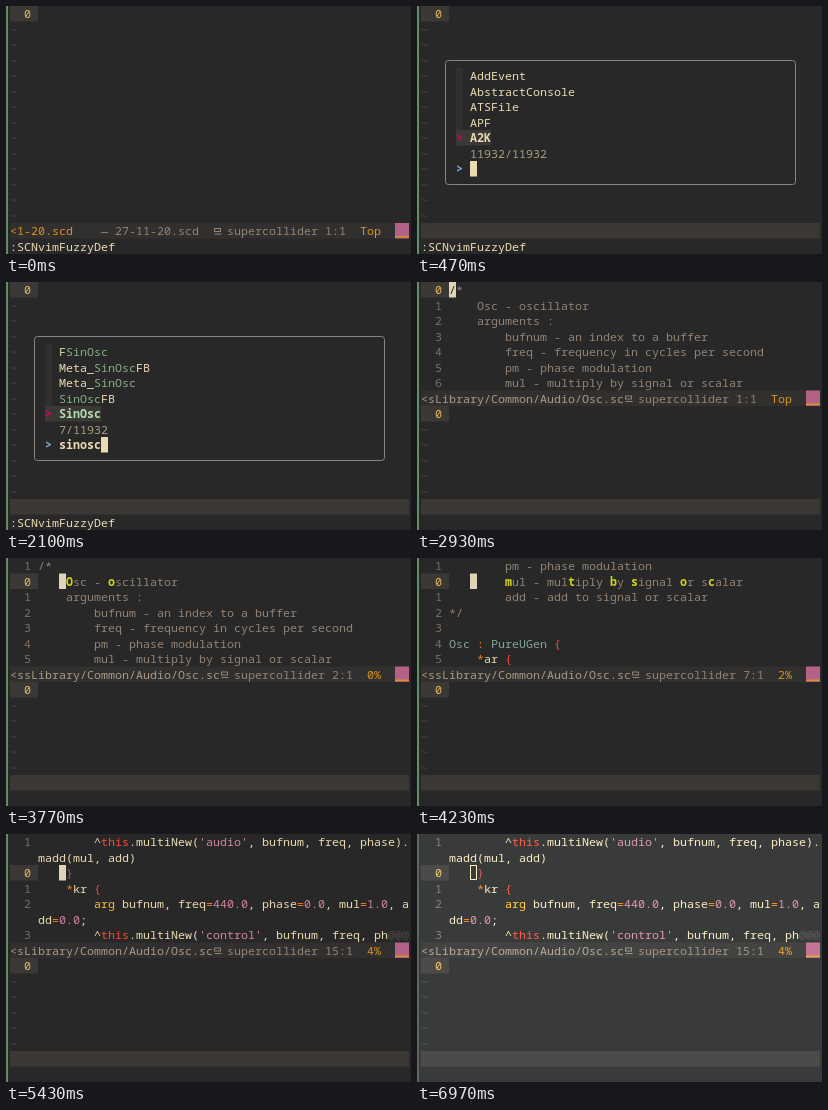
Write an HTML page with a canvas that moves like this. It is 405 px wide and 248 px high and loops after 7060 ms.

```html
<!DOCTYPE html>
<html>
<head>
<meta charset="utf-8">
<style>
html, body { margin: 0; width: 100%; height: 100%; overflow: hidden; background: #282828; }
canvas { display: block; }
</style>
</head>
<body>
<canvas id="stage" width="405" height="248"></canvas>
<script>
const ctx = document.getElementById('stage').getContext('2d');
const LOOP = 7060, CW = 7, RH = 15.5, LEFT = 4, WRAP = 53;
const C = {
  bg: '#282828', bar: '#3c3836', status: '#32302f', text: '#ebdbb2', gray: '#928374',
  dim: '#504945', num: '#7c6f64', yellow: '#e9b95c', orange: '#d8921f', red: '#fb4934',
  pink: '#d3869b', blue: '#83a598', match: '#87af87', scope: '#d2d21c'
};

const source = [
  '/*',
  '    Osc - oscillator',
  '    arguments :',
  '        bufnum - an index to a buffer',
  '        freq - frequency in cycles per second',
  '        pm - phase modulation',
  '        mul - multiply by signal or scalar',
  '        add - add to signal or scalar',
  '*/',
  '',
  'Osc : PureUGen {',
  '    *ar {',
  '        arg bufnum, freq=440.0, phase=0.0, mul=1.0, add=0.0;',
  "        ^this.multiNew('audio', bufnum, freq, phase).madd(mul, add)",
  '    }',
  '    *kr {',
  '        arg bufnum, freq=440.0, phase=0.0, mul=1.0, add=0.0;',
  "        ^this.multiNew('control', bufnum, freq, phase).madd(mul, add)"
];
const COMMENT_LINES = 9, TOTAL_LINES = 340;

// time, first visible line, cursor line
const views = [
  [2930, 1, 1], [3770, 1, 2], [3930, 1, 3], [4070, 1, 4],
  [4230, 6, 7], [4870, 11, 12], [5430, 14, 15]
];

// time, query, counter, results from top to bottom
const searches = [
  [200, '', '', ''],
  [290, '', '0/0', ''],
  [380, '', '5210/5210', 'AddEvent AbstractConsole ATSFile APF A2K'],
  [470, '', '11932/11932', 'AddEvent AbstractConsole ATSFile APF A2K'],
  [1670, 's', '6030/11932', 'Saw s_ sc sr s'],
  [1770, 'si', '1486/11932', 'Sieve size sign Sink sin'],
  [1800, 'sin', '418/11932', 'sinh Sink SinOsc Sine sin'],
  [1970, 'sino', '12/11932', 'FSinOsc Meta_SinOscFB Meta_SinOsc SinOscFB SinOsc'],
  [2035, 'sinos', '8/11932', 'FSinOsc Meta_SinOscFB Meta_SinOsc SinOscFB SinOsc'],
  [2100, 'sinosc', '7/11932', 'FSinOsc Meta_SinOscFB Meta_SinOsc SinOscFB SinOsc']
];

const latest = (list, t) => list.filter(item => item[0] <= t).pop();

function cells(row, col, width, color, height = 1) {
  ctx.fillStyle = color;
  ctx.fillRect(LEFT + col * CW, row * RH, width * CW, height * RH);
}

// color and bold may be functions of the character index
function put(row, col, text, color, bold = false) {
  [...text].forEach((ch, i) => {
    const c = typeof color === 'function' ? color(i) : color;
    ctx.font = `${bold || c === C.scope ? 'bold ' : ''}11.667px "Noto Sans Mono", monospace`;
    ctx.fillStyle = c;
    ctx.fillText(ch, LEFT + (col + i) * CW, row * RH + 12);
  });
}

function lineNumber(row, n) {
  if (!n) cells(row, 0, 4, C.bar);
  put(row, 2, String(n), n ? C.num : C.yellow);
}

function tildes(from, to) {
  for (let r = from; r <= to; r++) put(r, 0, '~', C.dim);
}

function statusLine(row, right, drawLeft) {
  cells(row, 0, 57, C.status);
  const info = 'supercollider ' + right;
  const col = 53 - info.length, split = info.lastIndexOf(' ');
  put(row, col, info, i => i > split ? C.orange : C.gray);
  const x = LEFT + (col - 2) * CW + 1.5, y = row * RH + 5.5;
  ctx.strokeStyle = C.gray;
  ctx.lineWidth = 1;
  ctx.strokeRect(x, y, 6, 3);
  ctx.beginPath();
  ctx.moveTo(x, y + 5.5);
  ctx.lineTo(x + 7, y + 5.5);
  ctx.stroke();
  drawLeft(col - 4);
  cells(row, 55, 2, '#b16286');
  ctx.fillStyle = C.orange;
  ctx.fillRect(LEFT + 55 * CW, row * RH + 13, 2 * CW, 1.5);
}

function lineColors(n, isCurrent) {
  const line = source[n - 1];
  const colors = Array(line.length).fill(n <= COMMENT_LINES ? C.gray : C.text);
  if (n > COMMENT_LINES) {
    const tokens = [
      [/[*=:]/g, '#fe8019'], [/[{}]/g, C.red], [/\bthis\b/g, C.red], [/\barg\b/g, '#fabd2f'],
      [/'\w+'|\d+\.\d/g, C.pink], [/\b[A-Z]\w+/g, C.blue]
    ];
    for (const [re, color] of tokens)
      for (const m of line.matchAll(re)) colors.fill(color, m.index, m.index + m[0].length);
  }
  if (isCurrent) {
    // mark the first unseen letter of each word
    const seen = new Set();
    for (const m of line.matchAll(/\w+/g)) {
      const k = [...m[0]].findIndex(ch => !seen.has(ch));
      if (k >= 0) colors[m.index + k] = C.scope;
      [...m[0]].forEach(ch => seen.add(ch));
    }
    if (line.trim() === '}') colors.fill('#b5504a');
  }
  return colors;
}

function drawCursor(row, col, ch, hollow) {
  if (hollow) {
    ctx.strokeStyle = C.text;
    ctx.lineWidth = 1;
    ctx.strokeRect(LEFT + col * CW + 0.5, Math.round(row * RH) + 0.5, CW - 1, 14);
    return;
  }
  cells(row, col, 1, '#e0d4b8');
  put(row, col, ch, C.bg);
}

function drawSource(t) {
  const [, top, current] = latest(views, t);
  const blinkedOff = (t >= 3530 && t < 3770) || (t >= 6100 && t < 6600);
  for (let row = 0, n = top; row < 7 && n <= source.length; n++) {
    const line = source[n - 1], colors = lineColors(n, n === current);
    lineNumber(row, Math.abs(n - current));
    const rows = Math.max(1, Math.ceil(line.length / WRAP));
    const cut = row + rows > 7;
    for (let k = 0; k < rows && row < 7; k++, row++) {
      const start = k * WRAP;
      put(row, 4, line.slice(start, start + (cut ? WRAP - 3 : WRAP)), i => colors[start + i]);
      if (cut) put(row, 54, '@@@', C.dim);
    }
    if (n === current && !blinkedOff) {
      const col = n === 1 ? 0 : 3;
      drawCursor(row - 1, 4 + col, line[col], t >= 6900);
    }
  }
  const place = current === 1 ? 'Top' : Math.floor(100 * current / TOTAL_LINES) + '%';
  statusLine(7, `${current}:1  ${place}`, width =>
    put(7, 0, '<' + 'SCClassLibrary/Common/Audio/Osc.sc'.slice(1 - width - 2), '#a89984'));
  lineNumber(8, 0);
  tildes(9, 13);
  cells(14, 0, 57, C.bar);
}

function drawFinder(t) {
  const [, query, count, names] = latest(searches, t);
  cells(3, 3, 51, C.bg, 9);
  ctx.strokeStyle = '#8a857c';
  ctx.lineWidth = 1;
  ctx.beginPath();
  ctx.roundRect(28.5, 54.5, 350, 124, 3);
  ctx.stroke();
  if (!count) return;
  const selected = t >= 2630 ? 3 : 4;
  if (names) {
    cells(4, 5, 1, C.status, 5);
    names.split(' ').forEach((name, i) => {
      const row = 4 + i, on = i === selected;
      const at = query ? name.toLowerCase().indexOf(query) : -1;
      const hit = k => at >= 0 && k >= at && k < at + query.length;
      if (on) {
        cells(row, 5, 2 + name.length, C.bar);
        put(row, 5, '>', '#d7005f', true);
      }
      put(row, 7, name, k => hit(k) ? (on ? '#afdfaf' : C.match) : C.text, on);
    });
  }
  put(9, 7, count, '#a8a080');
  put(10, 5, '>', '#87afd7', true);
  put(10, 7, query, C.text, true);
  cells(10, 7 + query.length, 1, C.text);
}

function drawStart(t) {
  lineNumber(0, 0);
  tildes(1, 13);
  put(15, 0, ':SCNvimFuzzyDef', C.text);
  if (t < 200) {
    statusLine(14, '1:1  Top', () => {
      put(14, 0, '<1-20.scd', C.orange);
      put(14, 13, '— 27-11-20.scd', C.gray);
    });
  } else {
    cells(14, 0, 57, C.bar);
    drawFinder(t);
  }
}

function draw(t) {
  ctx.fillStyle = C.bg;
  ctx.fillRect(0, 0, 405, 248);
  const fade = t < 6900 ? 0 : t < 6935 ? 1 / 3 : t < 6970 ? 2 / 3 : 1;
  ctx.fillStyle = fade ? '#4a524b' : '#5f8f64';
  ctx.fillRect(0, 0, 2, 248);
  if (t < 2930) drawStart(t);
  else drawSource(t);
  if (fade) {
    ctx.globalCompositeOperation = 'lighter';
    ctx.fillStyle = `rgba(17, 19, 19, ${fade})`;
    ctx.fillRect(0, 0, 405, 248);
    ctx.globalCompositeOperation = 'source-over';
  }
}

function tick() {
  draw(performance.now() % LOOP);
  requestAnimationFrame(tick);
}
tick();
</script>
</body>
</html>
```
